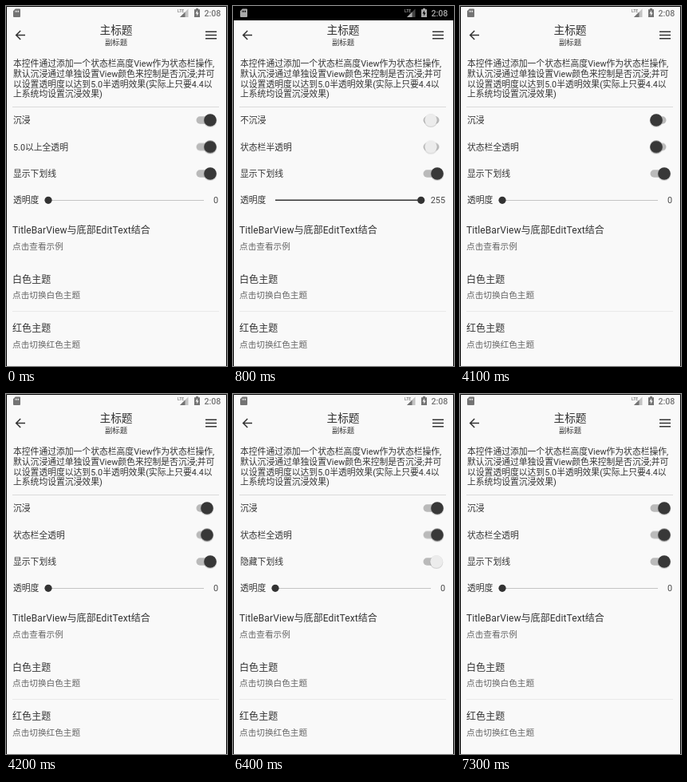
Write an HTML page that moves like this. It is 277 px wide and 451 px high and loops after 8 s.

```html
<!DOCTYPE html>
<html lang="zh-CN">
<head>
<meta charset="utf-8">
<title>主标题</title>
<style>
html, body { margin: 0; width: 100%; height: 100%; overflow: hidden; background: #f9f9f9; }
svg { display: block; width: 277px; height: 451px; }
text { font: 10.8px Roboto, "Noto Sans CJK SC", "Noto Sans CJK", sans-serif; fill: #333; }
.title { font-size: 13.7px; text-anchor: middle; }
.subtitle { font-size: 9.4px; text-anchor: middle; }
.head { font-size: 12px; letter-spacing: .1px; }
.hint { font-size: 10.65px; fill: #666; }
.value { text-anchor: end; fill: #484848; }
.clock { font-size: 10.6px; font-weight: 500; fill: currentColor; }
.lte { font-size: 5px; font-weight: 500; fill: currentColor; }
.line { fill: none; stroke: #333; stroke-width: 1.5; }
.track { fill: #bababa; }

/* everything changes in hard steps on one shared clock */
.bar, .icons, .on, .off, .first, .later, .shown, .hidden, .knob, .knob3 {
  animation: 8s step-end infinite;
}
.bar { animation-name: bar; }
.icons { animation-name: icons; }
.on { animation-name: on; }
.off { animation-name: off; }
.first { animation-name: first; }
.later { animation-name: later; }
.shown { animation-name: shown; }
.hidden { animation-name: hidden; }
.knob { animation-name: knob; }
.knob3 { animation-name: knob3; }

@keyframes bar { 0%, 51.25% { fill: #f9f9f9 } 8.75% { fill: #000 } }
@keyframes icons {
  0%, 51.25% { color: #747474 }
  8.75% { color: #000 }
  10% { color: #aaa }
  11.25% { color: #fff }
}
@keyframes on { 0%, 51.25% { visibility: visible } 8.75% { visibility: hidden } }
@keyframes off { 0%, 51.25% { visibility: hidden } 8.75% { visibility: visible } }
@keyframes first { 0% { visibility: visible } 8.75%, 100% { visibility: hidden } }
@keyframes later { 0% { visibility: hidden } 51.25%, 100% { visibility: visible } }
@keyframes shown { 0%, 88.75% { visibility: visible } 80% { visibility: hidden } }
@keyframes hidden { 0%, 88.75% { visibility: hidden } 80% { visibility: visible } }
@keyframes knob {
  0%, 53.75%, 100% { transform: translateX(256px); fill: #383838 }
  8.75% { transform: translateX(255.5px); fill: #ececec }
  10% { transform: translateX(248px); fill: #ececec }
  11.25% { transform: translateX(241px); fill: #ececec }
  51.25% { transform: translateX(246px); fill: #383838 }
  52.5% { transform: translateX(252px); fill: #383838 }
}
@keyframes knob3 {
  0%, 91.25%, 100% { transform: translateX(256px); fill: #383838 }
  80% { transform: translateX(255px); fill: #ececec }
  81.25% { transform: translateX(248px); fill: #ececec }
  82.5% { transform: translateX(241px); fill: #ececec }
  88.75% { transform: translateX(246px); fill: #383838 }
  90% { transform: translateX(252px); fill: #383838 }
}
</style>
</head>
<body>
<svg viewBox="0 0 277 451">
  <defs>
    <rect id="track" class="track" x="238.5" y="-4.7" width="20" height="9.4" rx="4.7"/>
    <g id="disc">
      <circle cy=".7" r="8.4" fill="#000" opacity=".14"/>
      <circle r="7.8"/>
    </g>
  </defs>
  <rect width="277" height="451" fill="#f9f9f9"/>

  <!-- status bar -->
  <rect class="bar" width="277" height="18"/>
  <g class="icons" fill="currentColor">
    <path fill-rule="evenodd" d="M11.8 3.5H17a1 1 0 0 1 1 1V13a1 1 0 0 1-1 1h-7a1 1 0 0 1-1-1V6.3z
      M11.5 5.8v2h1v-2z M13.3 5.8v2h1v-2z M15.1 5.8v2h1v-2z"/>
    <text class="lte" x="215" y="8.3">LTE</text>
    <path opacity=".4" d="M228.5 3.5V14H218z"/>
    <path d="M224.5 7.5V14H218z"/>
    <path fill-rule="evenodd" d="M238 3h3v1.2h2V14h-7V4.2h2z M240 5.5l-2.5 4h1.7v3l2.4-4.1h-1.6z"/>
    <text class="clock" x="248.5" y="13">2:08</text>
  </g>

  <!-- title bar -->
  <path class="line" d="M24 36.5H13 M18.2 31L12.7 36.5l5.5 5.5"/>
  <path class="line" d="M250 32.2h14 M250 36.5h14 M250 40.8h14"/>
  <text class="title" x="138" y="35.3">主标题</text>
  <text class="subtitle" x="138" y="49.2">副标题</text>

  <!-- description -->
  <text x="9" y="76">本控件通过添加一个状态栏高度View作为状态栏操作,</text>
  <text x="9" y="88.8">默认沉浸通过单独设置View颜色来控制是否沉浸;并可</text>
  <text x="9" y="101.5">以设置透明度以达到5.0半透明效果(实际上只要4.4以</text>
  <text x="9" y="114.2">上系统均设置沉浸效果)</text>
  <path d="M8 126.5h259" stroke="#dadada"/>

  <!-- switches -->
  <text class="on" x="9" y="147">沉浸</text>
  <text class="off" x="9" y="147">不沉浸</text>
  <text class="first" x="9" y="180.5">5.0以上全透明</text>
  <text class="off" x="9" y="180.5">状态栏半透明</text>
  <text class="later" x="9" y="180.5">状态栏全透明</text>
  <text class="shown" x="9" y="214">显示下划线</text>
  <text class="hidden" x="9" y="214">隐藏下划线</text>
  <g transform="translate(0 143)"><use href="#track"/><g class="knob"><use href="#disc"/></g></g>
  <g transform="translate(0 176.5)"><use href="#track"/><g class="knob"><use href="#disc"/></g></g>
  <g transform="translate(0 210)"><use href="#track"/><g class="knob3"><use href="#disc"/></g></g>

  <!-- slider -->
  <text x="9" y="247.3">透明度</text>
  <g class="on">
    <path d="M53 243.5h195" stroke="#c4c4c4"/>
    <circle cx="53" cy="243.3" r="4.6" fill="#333"/>
    <text class="value" x="266" y="247.3">0</text>
  </g>
  <g class="off">
    <path class="line" d="M53 243.3h183"/>
    <circle cx="235.7" cy="243.3" r="4.6" fill="#333"/>
    <text class="value" x="266" y="247.3">255</text>
  </g>

  <!-- list -->
  <path d="M8 382.5h259" stroke="#e9e9e9"/>
  <text class="head" x="8" y="285.2">TitleBarView与底部EditText结合</text>
  <text class="hint" x="8" y="305">点击查看示例</text>
  <text class="head" x="8" y="346.7">白色主题</text>
  <text class="hint" x="8" y="366.4">点击切换白色主题</text>
  <text class="head" x="8" y="408">红色主题</text>
  <text class="hint" x="8" y="427.6">点击切换红色主题</text>

  <path d="M.5 451V.5h276V451" fill="none" stroke="#000"/>
</svg>
</body>
</html>
```
